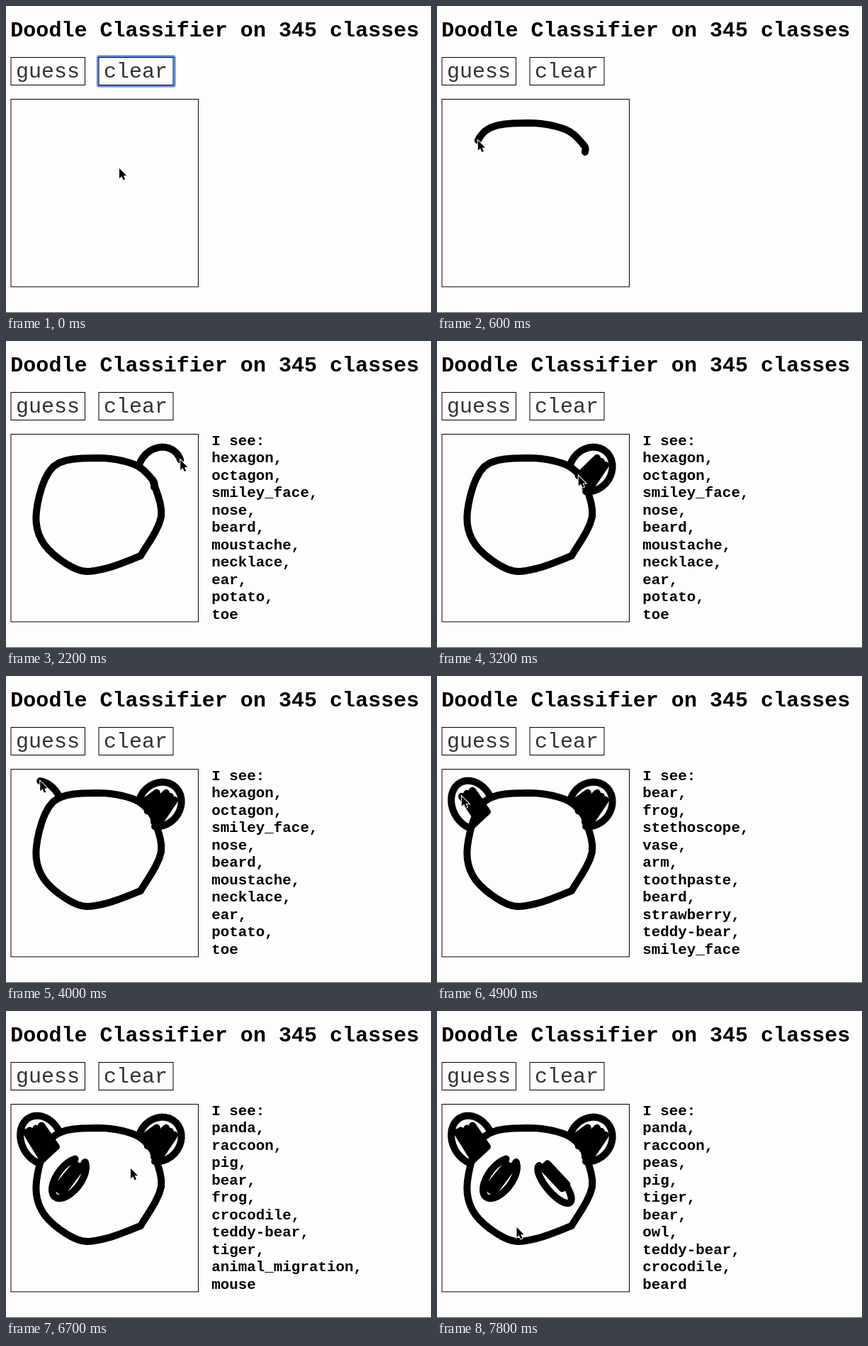
These frames come from a looping animation (600 px wide and 433 px high, 8 s). An HTML page:

```html
<!DOCTYPE html>
<html lang="en">
<head>
<meta charset="utf-8">
<title>Doodle Classifier</title>
<style>
  html, body { margin: 0; width: 100%; height: 100%; overflow: hidden; background: #fefdfe; }
  svg { display: block; width: 100vw; height: 100vh; }
  text { font-family: "Courier New", "Liberation Mono", monospace; white-space: pre; }
  .title { font-size: 30.05px; font-weight: bold; }
  .label { font-size: 30px; fill: #333; }
  .list { font-size: 20.85px; font-weight: bold; }
  .box { fill: none; stroke: #000; }
  .ink polyline { fill: none; stroke: #000; stroke-width: 10; stroke-linecap: round; stroke-linejoin: round; }
  #cursor { stroke: #fff; stroke-width: 2; paint-order: stroke; }
</style>
</head>
<body>
<svg viewBox="0 0 600 433">
  <text class="title" x="6.3" y="43">Doodle Classifier on 345 classes</text>
  <g id="ring" fill="none">
    <rect x="129" y="70.5" width="109.5" height="43" rx="2.5" stroke="#a9c8f7" stroke-width="3"/>
    <rect x="129.5" y="71" width="108.5" height="42" rx="2" stroke="#5790e4" stroke-width="2.4"/>
  </g>
  <rect class="box" x="7" y="72.5" width="104.5" height="39"/>
  <rect class="box" x="131" y="72.5" width="105" height="39"/>
  <text class="label" x="14" y="101">guess</text>
  <text class="label" x="138" y="101">clear</text>
  <rect class="box" x="7" y="131.5" width="264.5" height="264.5"/>
  <path d="M0 432.5H600" stroke="#555"/>
  <g id="list"></g>
  <g id="ink" class="ink"></g>
  <path id="cursor" d="M0 0V14.2L3.3 11.2 5.6 16.4 8 15.4 5.8 10.3H10.2Z"/>
</svg>
<script>
const NS = 'http://www.w3.org/2000/svg';
const $ = id => document.getElementById(id);
const LOOP = 8000, STEP = 100, LAST = 7800;
const mix = (a, b, k) => a + (b - a) * k;
const rad = deg => deg * Math.PI / 180;

function add(parent, tag, attrs) {
  const el = document.createElementNS(NS, tag);
  for (const key in attrs) el.setAttribute(key, attrs[key]);
  return parent.appendChild(el);
}

// A tilted ellipse; u runs along the long axis and v across it, both -1 to 1.
function oval(x, y, long, short, tilt) {
  const c = Math.cos(rad(tilt)), s = Math.sin(rad(tilt));
  return (u, v) => [x + u * long * c - v * short * s, y + u * long * s + v * short * c];
}

function arc(at, from, to, n = 24) {
  return Array.from({ length: n + 1 }, (_, i) => {
    const a = rad(mix(from, to, i / n));
    return at(Math.cos(a), Math.sin(a));
  });
}

// Zigzag along the long axis, drifting across from v0 to v1.
function hatch(at, n, reach, v0, v1) {
  return Array.from({ length: n + 1 }, (_, i) => at(i % 2 ? reach : -reach, mix(v0, v1, i / n)));
}

// Smooth curve through a few points.
function spline(pts, n = 6) {
  const out = [pts[0]];
  for (let i = 0; i < pts.length - 1; i++) {
    const b = pts[i], c = pts[i + 1], a = pts[i - 1] || b, d = pts[i + 2] || c;
    for (let j = 1; j <= n; j++) {
      const k = j / n;
      out.push([0, 1].map(x => b[x] + k / 2 * (c[x] - a[x]
        + k * (2 * a[x] - 5 * b[x] + 4 * c[x] - d[x]
        + k * (3 * (b[x] - c[x]) + d[x] - a[x])))));
    }
  }
  return out;
}

const headStart = [209, 206], headJoin = [207, 196], headGap = [190, 303];
const head = spline([headStart, headJoin, [181, 174], [128, 165], [67, 177], [43, 240], [54, 287], [100, 322], [140, 321], headGap]);
const headClose = spline([headGap, [219, 248], headJoin]);

const earR = oval(217, 181, 33, 29, -50);
const earL = oval(50, 182, 36, 28, -118);
const eyeL = oval(89, 236, 33, 17, -53);
const eyeR = oval(166, 244, 34, 12, 50);
const lidR = oval(165, 234, 20, 12, 50);

const moves = [];
let clock = 0, pen = [160, 229];
function move(end, pts, line = null) {
  moves.push({ start: clock, end, pts: [pen, ...pts], line });
  pen = pts[pts.length - 1];
  clock = end;
}
// Carry the pen to the start of a stroke by `begin`, then draw it until `end`.
function stroke(begin, end, pts) {
  if (begin > clock) move(begin, [pts[0]]);
  move(end, pts, add($('ink'), 'polyline'));
}

stroke(250, 1100, head);
stroke(1100, 1520, headClose);
stroke(1850, 2500, arc(earR, -116, 149));
stroke(2500, 3200, hatch(earR, 6, 0.55, 0.55, -0.25));
stroke(3200, 3350, hatch(earR, 2, 0.3, -0.3, -0.65));
stroke(3800, 4500, arc(earL, 95, -138));
stroke(4500, 4900, hatch(earL, 5, 0.5, 0.5, -0.27));
stroke(4900, 5350, hatch(earL, 3, 0.55, -0.2, -0.5));
stroke(5600, 6050, arc(eyeL, -35, -345));
stroke(6050, 6450, hatch(eyeL, 6, 0.65, 0.28, -0.35));
move(6700, [[176, 222]]);
stroke(6850, 7200, arc(eyeR, 180, -60));
stroke(7200, 7500, hatch(lidR, 5, 1, 0.3, -0.6));
move(LAST, [[112.5, 305]]);

const guesses = [
  [1600, 'hexagon octagon smiley_face nose beard moustache necklace ear potato toe'],
  [4700, 'bear frog stethoscope vase arm toothpaste beard strawberry teddy-bear smiley_face'],
  [6500, 'panda raccoon pig bear frog crocodile teddy-bear tiger animal_migration mouse'],
  [7600, 'panda raccoon peas pig tiger bear owl teddy-bear crocodile beard']
];
const rows = Array.from({ length: 11 }, (_, i) =>
  add($('list'), 'text', { class: 'list', x: 290.3, y: 147 + i * 24.45 }));

// The part of a path covered after the given share of its length.
function partial(pts, share) {
  const dist = (a, b) => Math.hypot(b[0] - a[0], b[1] - a[1]);
  let left = share * pts.slice(1).reduce((sum, p, i) => sum + dist(pts[i], p), 0);
  const out = [pts[0]];
  for (let i = 1; i < pts.length; i++) {
    const a = pts[i - 1], b = pts[i], d = dist(a, b);
    if (left < d) {
      out.push([mix(a[0], b[0], left / d), mix(a[1], b[1], left / d)]);
      break;
    }
    out.push(b);
    left -= d;
  }
  return out;
}

function draw(t) {
  let tip = moves[0].pts[0];
  for (const { start, end, pts, line } of moves) {
    const path = t > start ? partial(pts, Math.min(1, (t - start) / (end - start))) : [];
    if (path.length) tip = path[path.length - 1];
    if (line) line.setAttribute('points', path.join(' '));
  }
  $('cursor').setAttribute('transform', `translate(${tip})`);
  $('ring').style.display = t < 300 ? '' : 'none';

  const shown = guesses.filter(g => t >= g[0]).pop();
  const lines = shown ? ['I see:', ...shown[1].replaceAll(' ', ', ').split(' ')] : [];
  rows.forEach((row, i) => { row.textContent = lines[i] || ''; });
}

let drawn = -1;
function tick() {
  const t = Math.min(LAST, Math.floor(performance.now() % LOOP / STEP) * STEP);
  if (t !== drawn) draw(drawn = t);
  requestAnimationFrame(tick);
}
tick();
</script>
</body>
</html>
```
